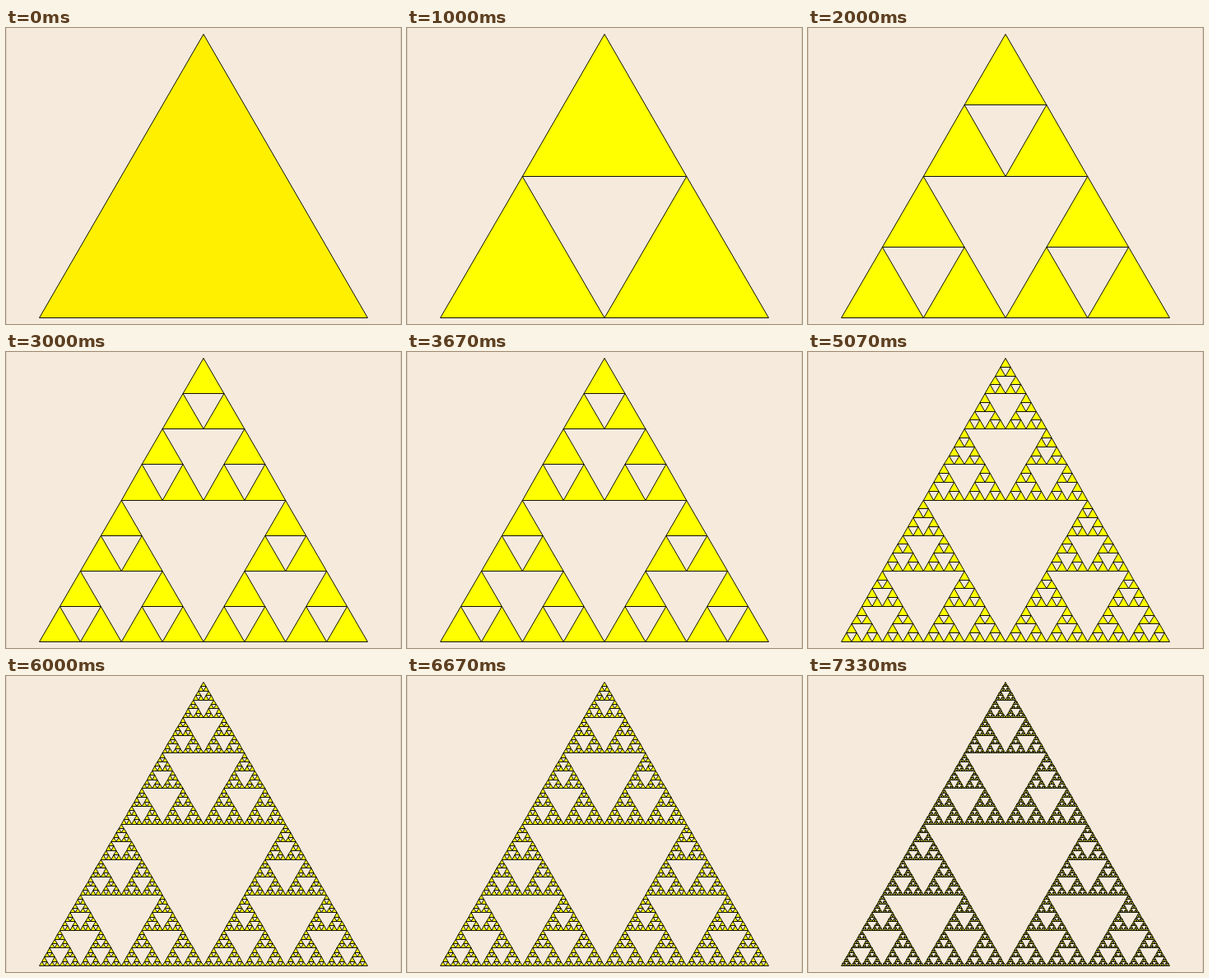
These frames come from a looping animation (480 by 360 pixels, 7990 ms). An HTML page with a canvas:

```html
<!DOCTYPE html>
<html lang="en">
<head>
<meta charset="utf-8">
<title>Sierpinski triangle</title>
<style>
  html, body { margin: 0; width: 100%; height: 100%; overflow: hidden; background: #f6eadc; }
  canvas { display: block; }
</style>
</head>
<body>
<canvas id="stage" width="480" height="360"></canvas>
<script>
const ctx = document.getElementById('stage').getContext('2d');
const LOOP = 7990, STEP = 1000, MAX_DEPTH = 7;
const APEX = [240, 7.5], LEFT = [40.5, 352.5], RIGHT = [439.5, 352.5];

const mid = (p, q) => [(p[0] + q[0]) / 2, (p[1] + q[1]) / 2];
const snap = ([x, y]) => [x, Math.floor(y) + 0.5];

function addTriangles(path, a, b, c, depth) {
  if (depth === 0) {
    path.moveTo(...snap(a));
    path.lineTo(...snap(b));
    path.lineTo(...snap(c));
    path.closePath();
    return;
  }
  const ab = mid(a, b), bc = mid(b, c), ca = mid(c, a);
  addTriangles(path, a, ab, ca, depth - 1);
  addTriangles(path, ab, b, bc, depth - 1);
  addTriangles(path, ca, bc, c, depth - 1);
}

const levels = Array.from({ length: MAX_DEPTH + 1 }, (_, depth) => {
  const path = new Path2D();
  addTriangles(path, APEX, LEFT, RIGHT, depth);
  return path;
});

function draw(depth) {
  ctx.fillStyle = '#f6eadc';
  ctx.fillRect(0, 0, 480, 360);
  ctx.fillStyle = '#ded5ca';
  ctx.fillRect(0, 0, 1, 360);
  ctx.fillRect(479, 0, 1, 360);

  ctx.fillStyle = depth ? '#ffff00' : '#fff000';
  ctx.strokeStyle = '#111100';
  ctx.lineWidth = 1;
  ctx.lineJoin = 'round';
  ctx.fill(levels[depth]);
  ctx.stroke(levels[depth]);
}

function frame() {
  const t = performance.now() % LOOP;
  draw(Math.min(MAX_DEPTH, Math.floor(t / STEP)));
  requestAnimationFrame(frame);
}
frame();
</script>
</body>
</html>
```
